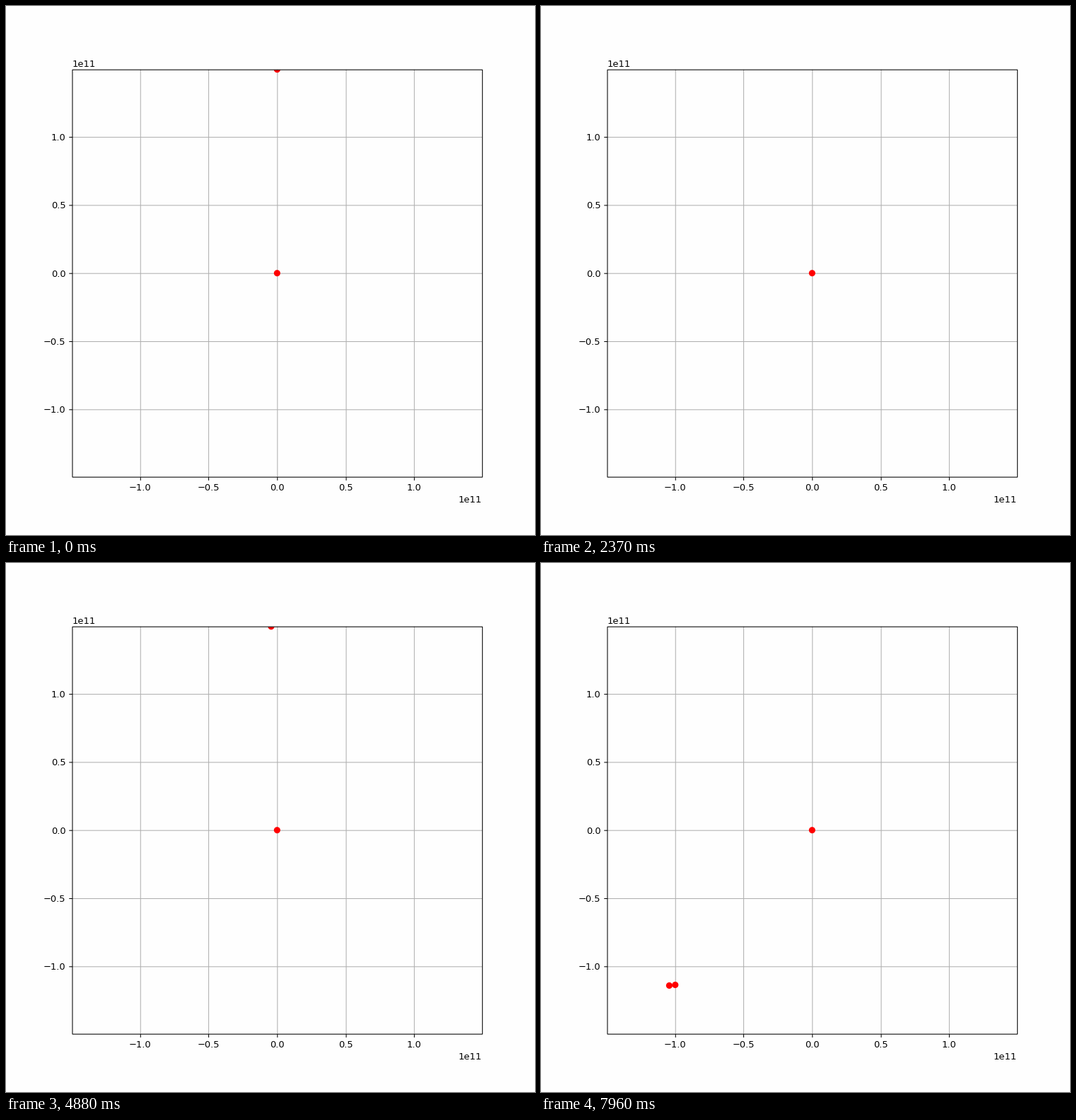
These frames come from a looping animation (748 by 748 pixels, 7.99 s). A matplotlib script:

```python
import math

import matplotlib.pyplot as plt
from matplotlib.animation import FuncAnimation
from matplotlib.patches import Circle, Rectangle

LOOP_MS, TICK_MS, STEP_MS = 7990, 10, 30
BACK = "#fefefe"

# Layout units: an 8 inch square of 100 units per inch, y down
UNITS, STAGE = 800, 748
POINT = 100 / 72
LEFT, RIGHT, TOP, BOTTOM = 100, 720, 96, 712
MID_X, MID_Y = (LEFT + RIGHT) / 2, (TOP + BOTTOM) / 2
LINE_HEIGHT = 14

AU = 1.496e11
ECC = 0.0195                        # planet orbit, starting at perihelion
PLANET_RATE = math.radians(2.2118)  # mean motion per step
MOON_RATE = math.radians(33.04)
MOON_SIZE = 4.1e9, 3.85e9           # half axes of the moon's path
MOON_SHIFT = 0.2e9, 0.15e9

# (start ms, first step, last step): the bodies are out of view between runs
RUNS = [(0, 0, 79), (2600, 86, 242), (7510, 249, 264)]


def step_at(ms):
    start, first, last = [run for run in RUNS if run[0] <= ms][-1]
    return min(last, first + (ms - start) // STEP_MS)


def planet_pos(step):
    mean = PLANET_RATE * step
    angle = mean + 2 * ECC * math.sin(mean) + 1.25 * ECC**2 * math.sin(2 * mean)
    r = AU * (1 + ECC) / (1 + ECC * math.cos(angle))
    return r * math.sin(angle), r * math.cos(angle)


def moon_pos(step):
    x, y = planet_pos(step)
    angle = MOON_RATE * step
    return (x + MOON_SIZE[0] * math.sin(angle) + MOON_SHIFT[0],
            y + MOON_SIZE[1] * math.cos(angle) + MOON_SHIFT[1])


def to_units(x, y):
    return (MID_X + (RIGHT - LEFT) / 2 * x / AU,
            MID_Y - (BOTTOM - TOP) / 2 * y / AU)


def whole(value):
    return math.floor(value + 0.5)


def mid_pixel(value):
    return whole(value) + 0.5


def dot_center(pos):
    return tuple(whole(v) for v in to_units(*pos))


fig = plt.figure(figsize=(8, 8), dpi=STAGE / 8, facecolor=BACK)
ax = fig.add_axes([0, 0, 1, 1])
ax.set(xlim=(0, UNITS), ylim=(UNITS, 0))
ax.axis("off")


def line(xs, ys, color, z):
    ax.plot(xs, ys, color=color, lw=0.8, solid_capstyle="butt",
            snap=False, zorder=z)


def dot(pos):
    circle = Circle(dot_center(pos), 3.5 * POINT, fc="r", lw=0, zorder=2)
    ax.add_patch(circle)
    circle.set_clip_path(window)
    return circle


window = Rectangle((LEFT, TOP), RIGHT - LEFT, BOTTOM - TOP,
                   transform=ax.transData)
frame_box = Rectangle((mid_pixel(LEFT), mid_pixel(TOP)), RIGHT - LEFT,
                      BOTTOM - TOP, fill=False, ec="k", lw=0.8, snap=False,
                      zorder=3)
ax.add_patch(frame_box)

# Grid, tick marks and labels
tick, pad = 3.5 * POINT, 7 * POINT
for value in (-1.0, -0.5, 0.0, 0.5, 1.0):
    x, y = to_units(value * 1e11, value * 1e11)
    gx, gy = mid_pixel(x), mid_pixel(y)
    line([gx, gx], [TOP, BOTTOM], "#b0b0b0", 1)
    line([LEFT, RIGHT], [gy, gy], "#b0b0b0", 1)
    line([gx, gx], [mid_pixel(BOTTOM), mid_pixel(BOTTOM + tick)], "k", 3)
    line([mid_pixel(LEFT - tick), mid_pixel(LEFT)], [gy, gy], "k", 3)
    label = f"{value:.1f}".replace("-", "\u2212")
    ax.text(x, BOTTOM + pad, label, ha="center", va="top")
    ax.text(LEFT - pad, y, label, ha="right", va="center_baseline")

gap = 3 * POINT
ax.text(LEFT, TOP - gap, "1e11", ha="left", va="baseline")
ax.text(RIGHT, BOTTOM + pad + LINE_HEIGHT + gap, "1e11", ha="right", va="top")

dot((0, 0))
planet = dot(planet_pos(0))
moon = dot(moon_pos(0))


def update(frame):
    step = step_at(frame * TICK_MS)
    planet.center = dot_center(planet_pos(step))
    moon.center = dot_center(moon_pos(step))
    return planet, moon


anim = FuncAnimation(fig, update, frames=LOOP_MS // TICK_MS, interval=TICK_MS,
                     repeat=True, repeat_delay=0, init_func=lambda: update(0))
plt.show()
```
